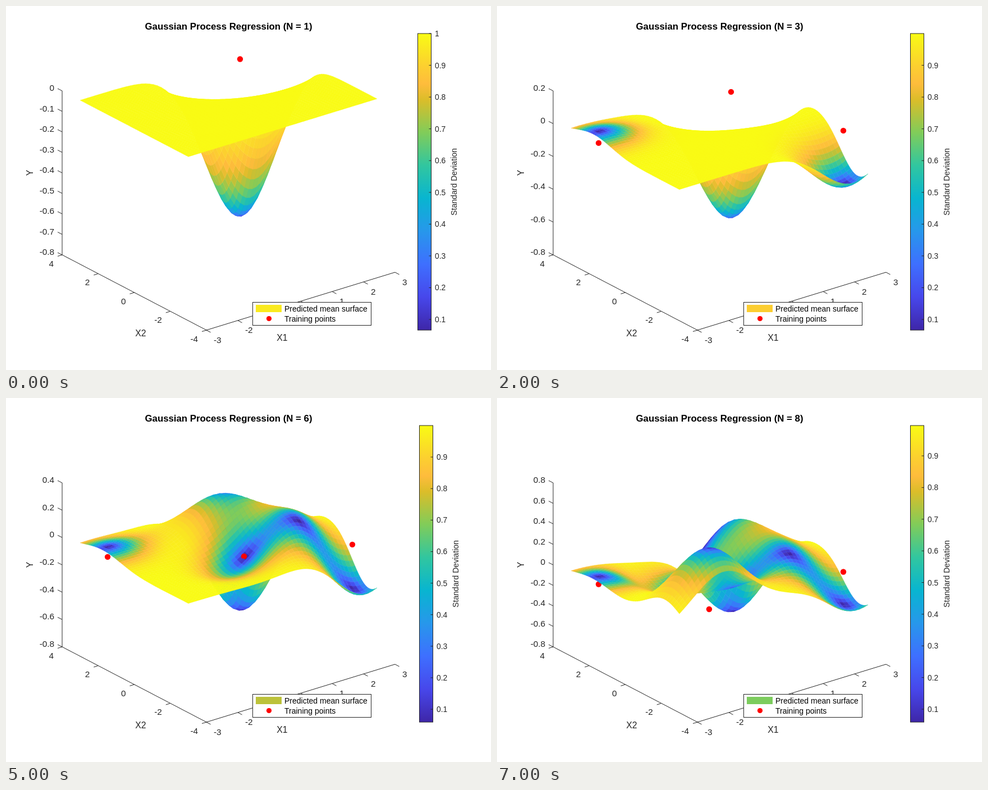
Recreate the animation shown at these times as an HTML page with a canvas. Size 864 px wide and 648 px high, loop 8000 ms.

```html
<!DOCTYPE html>
<html lang="en">
<head>
<meta charset="utf-8">
<title>Gaussian Process Regression</title>
<style>
  html, body { margin: 0; width: 100%; height: 100%; overflow: hidden; background: #fff; }
  canvas, svg { position: absolute; left: 0; top: 0; width: 864px; height: 648px; display: block; }
  text { font-family: "Liberation Sans", Arial, sans-serif; fill: #262626; dominant-baseline: central; }
  line, .box { stroke: #262626; stroke-width: 1; }
</style>
</head>
<body>
<canvas id="plot" width="864" height="648"></canvas>
<svg id="chart" viewBox="0 0 864 648"></svg>
<script>
const STEP = 1000, STEPS = 8, GRID = 50, NOISE = 0.0025, Z_MIN = -0.8;

// Training samples: x1, x2, observed value
const samples = [
  [1.783, 2.471, -0.767], [-2.833, 1.769, 0.065],
  [2.544, -2.429, -0.337], [1.385, -1.4, 0.175],
  [-0.081, -0.998, -0.028], [0.55, 1.15, 0.25],
  [-1.578, -2.174, 0.6], [-0.1, 1.3, -0.025]
];
const zTop = [0, 0.2, 0.2, 0.4, 0.2, 0.4, 0.8, 0.8];

// Position, red, green, blue
const colours = [
  [0, 62, 38, 168], [1 / 9, 71, 71, 235], [2 / 9, 62, 111, 255], [3 / 9, 39, 151, 235],
  [4 / 9, 8, 181, 208], [5 / 9, 49, 198, 159], [6 / 9, 129, 204, 89], [7 / 9, 220, 189, 41],
  [0.83, 254, 188, 60], [8 / 9, 252, 207, 48], [1, 249, 251, 20]
];

const ctx = document.getElementById("plot").getContext("2d");
const chart = document.getElementById("chart");

function colour(t) {
  t = Math.min(1, Math.max(0, t));
  let i = 1;
  while (i < colours.length - 1 && t > colours[i][0]) i++;
  const a = colours[i - 1], b = colours[i];
  const f = (t - a[0]) / (b[0] - a[0]);
  const [r, g, bl] = [1, 2, 3].map(c => Math.round(a[c] + (b[c] - a[c]) * f));
  return `rgb(${r},${g},${bl})`;
}

const kernel = (a, b) => Math.exp(-((a[0] - b[0]) ** 2 + (a[1] - b[1]) ** 2) / 2);

// Gauss-Jordan inverse; the kernel matrix is positive definite
function invert(m) {
  const n = m.length;
  const a = m.map((row, i) => [...row, ...row.map((_, j) => +(i === j))]);
  for (let i = 0; i < n; i++) {
    const p = a[i][i];
    a[i] = a[i].map(v => v / p);
    for (let r = 0; r < n; r++) {
      if (r === i) continue;
      const f = a[r][i];
      a[r] = a[r].map((v, c) => v - f * a[i][c]);
    }
  }
  return a.map(row => row.slice(n));
}

const dot = (a, b) => a.reduce((s, v, i) => s + v * b[i], 0);

function posterior(n) {
  const pts = samples.slice(0, n);
  const inv = invert(pts.map((p, i) => pts.map((q, j) => kernel(p, q) + (i === j ? NOISE : 0))));
  const weights = inv.map(row => dot(row, pts.map(p => p[2])));
  return (x1, x2) => {
    const k = pts.map(p => kernel(p, [x1, x2]));
    const variance = 1 - dot(k, inv.map(row => dot(row, k)));
    return { mean: dot(k, weights), std: Math.sqrt(Math.max(0, variance)) };
  };
}

const project = (x1, x2, z, top) => [
  357 + (x1 + 3) * 56 - (x2 + 4) * 257 / 8,
  577 - (x1 + 3) * 103 / 6 - (x2 + 4) * 134 / 8 - (z - Z_MIN) / (top - Z_MIN) * 292
];
const depth = (x1, x2) => x1 * 0.4976 + x2 * 0.8674;

function drawSurface(n, lo, hi) {
  const top = zTop[n - 1], predict = posterior(n), at = i => -3 + 6 * i / (GRID - 1);
  const nodes = [], items = [];
  let sum = 0;
  for (let j = 0; j < GRID; j++) {
    for (let i = 0; i < GRID; i++) {
      const g = predict(at(i), at(j));
      sum += g.std;
      nodes.push({ p: project(at(i), at(j), g.mean, top), t: (g.std - lo) / (hi - lo) });
    }
  }
  for (let j = 0; j < GRID - 1; j++) {
    for (let i = 0; i < GRID - 1; i++) {
      const k = j * GRID + i;
      items.push({
        d: depth(at(i + 0.5), at(j + 0.5)),
        fill: colour(nodes[k].t),
        path: [k, k + 1, k + GRID + 1, k + GRID].map(q => nodes[q].p)
      });
    }
  }
  for (const [x1, x2] of samples.slice(0, n)) {
    items.push({ d: depth(x1, x2), centre: project(x1, x2, 0, top) });
  }
  items.sort((a, b) => b.d - a.d);

  ctx.clearRect(0, 0, 864, 648);
  ctx.lineWidth = 0.5;
  ctx.lineJoin = "round";
  for (const it of items) {
    ctx.beginPath();
    if (it.centre) {
      ctx.arc(...it.centre, 5.2, 0, 7);
      ctx.fillStyle = "#f00";
      ctx.fill();
    } else {
      it.path.forEach(p => ctx.lineTo(...p));
      ctx.closePath();
      ctx.fillStyle = ctx.strokeStyle = it.fill;
      ctx.fill();
      ctx.stroke();
    }
  }
  return (sum / nodes.length - lo) / (hi - lo);
}

const line = (x, y, dx, dy) => `<line x1="${x}" y1="${y}" x2="${x + dx}" y2="${y + dy}"/>`;
const label = (s, x, y, size, anchor = "middle", extra = "") =>
  `<text x="${x}" y="${y}" font-size="${size}" text-anchor="${anchor}" ${extra}>${s}</text>`;
const upright = (x, y) => `transform="rotate(-90 ${x} ${y})"`;
const tidy = v => String(+v.toFixed(1) || 0);

function axes(top) {
  let s = line(100, 443, 0, -292) + line(100, 443, 257, 134) + line(357, 577, 336, -103);
  const gap = top ? 0.2 : 0.1, count = Math.round((top - Z_MIN) / gap);
  for (let i = 0; i <= count; i++) {
    const y = 443 - 292 * i / count;
    s += line(100, y, -8, -4) + label(tidy(Z_MIN + i * gap), 86, y - 5.5, 15.3, "end");
  }
  for (let v = -4; v <= 4; v += 2) {
    const [x, y] = project(-3, v, Z_MIN, top);
    s += line(x, y, -8, 2.5) + label(v, x - 15, y + 15, 15.3, "end");
  }
  for (let v = -3; v <= 3; v++) {
    const [x, y] = project(v, -4, Z_MIN, top);
    s += line(x, y, 7.5, 4) + label(v, x + 13, y + 17, 15.3, "start");
  }
  return s + label("X1", 492, 590, 15.8) + label("X2", 240, 582, 15.8) +
    label("Y", 42, 297, 15.8, "middle", upright(42, 297));
}

function colourBar(n, lo, hi) {
  const x = n === 1 ? 733.5 : 736.5, w = 24;
  const stops = colours.map(([t, ...c]) => `<stop offset="${t}" stop-color="rgb(${c})"/>`).join("");
  let s = `<linearGradient id="map" x1="0" y1="1" x2="0" y2="0">${stops}</linearGradient>
    <rect class="box" x="${x}" y="49" width="${w}" height="528" fill="url(#map)"/>`;
  for (let i = 1; i <= (n === 1 ? 10 : 9); i++) {
    const y = 577 - 528 * (i / 10 - lo) / (hi - lo);
    s += line(x + w, y, -4, 0) + label(tidy(i / 10), x + 30.5, y + 0.5, 13.8, "start");
  }
  const tx = x + 64.5;
  return s + label("Standard Deviation", tx, 313, 14.1, "middle", upright(tx, 313));
}

function legend(fill) {
  return `<rect class="box" x="439.5" y="527.5" width="211" height="41" fill="#fff"/>
    <rect x="445" y="532" width="46" height="13" fill="${fill}"/>
    <circle cx="468.5" cy="556.5" r="4.6" fill="#f00"/>` +
    label("Predicted mean surface", 496, 539, 14, "start", 'style="fill:#000"') +
    label("Training points", 496, 557, 14, "start", 'style="fill:#000"');
}

function render(n) {
  const lo = n < 4 ? 0.0664 : 0.0592;
  const hi = n === 8 ? 0.9958 : 1;
  const average = drawSurface(n, lo, hi);
  chart.innerHTML = axes(zTop[n - 1]) + colourBar(n, lo, hi) + legend(colour(average)) +
    label(`Gaussian Process Regression (N = ${n})`, 396.5, 36.5, 16.8, "middle",
      'font-weight="bold" style="fill:#000"');
}

let shown = 0;
const start = performance.now();
function tick() {
  const n = Math.floor((performance.now() - start) / STEP) % STEPS + 1;
  if (n !== shown) render(shown = n);
  requestAnimationFrame(tick);
}
tick();
</script>
</body>
</html>
```
